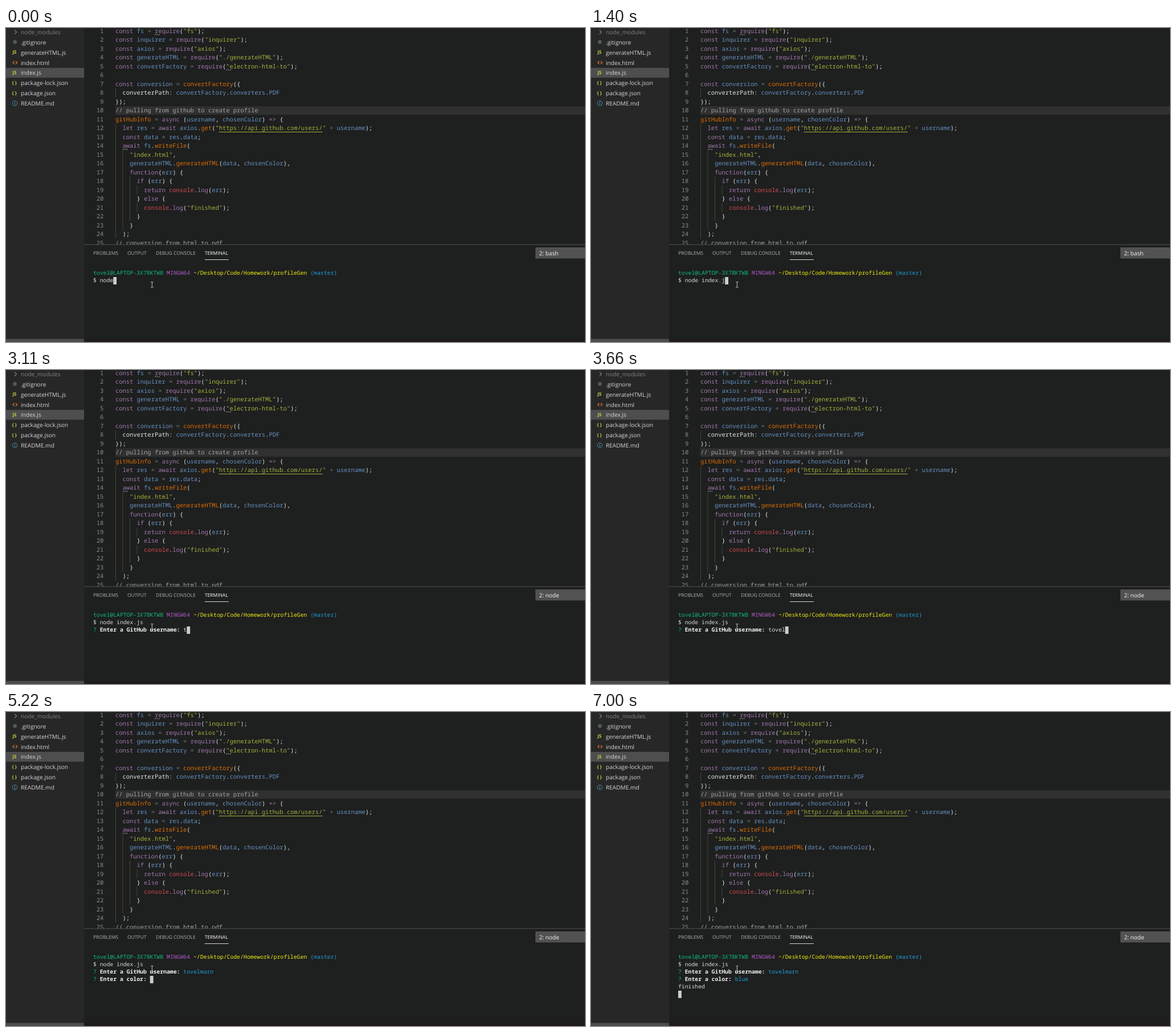
These frames come from a looping animation (1016 by 551 pixels, 8000 ms). An HTML page:

```html
<!DOCTYPE html>
<html lang="en">
<head>
<meta charset="utf-8">
<title>Terminal session</title>
<style>
  html, body { margin: 0; width: 100%; height: 100%; overflow: hidden; background: #1e1f1f; }
  svg { display: block; width: 100%; height: 100%; }
  text { white-space: pre; text-rendering: geometricPrecision; }
  .code { font: 500 10.44px "Noto Sans Mono", monospace; }
  .term { font: 500 9.775px "Noto Sans Mono", monospace; }
  .term.bold { font-weight: 700; }
  .ui { font: 10.1px "Open Sans", sans-serif; }
  .tab { font: 8.5px "Open Sans", sans-serif; }
  .icon { font: 700 8px "Open Sans", sans-serif; }
</style>
</head>
<body>
<svg id="stage" viewBox="0 0 1016 551"></svg>
<script>
const LOOP = 8000;
const BACK = "#1e1f1f";
const stage = document.getElementById("stage");

function add(parent, tag, attrs, content) {
  const el = document.createElementNS("http://www.w3.org/2000/svg", tag);
  for (const key in attrs) el.setAttribute(key, attrs[key]);
  if (content !== undefined) el.textContent = content;
  parent.appendChild(el);
  return el;
}
const rect = (x, y, width, height, fill, parent = stage) =>
  add(parent, "rect", { x, y, width, height, fill });
const label = (x, y, cls, fill, str, parent = stage) =>
  add(parent, "text", { x, y, class: cls, fill }, str);
const stroke = (d, color, width = 1, parent = stage) =>
  add(parent, "path", { d, fill: "none", stroke: color, "stroke-width": width });

const COLORS = {
  p: "#a078ac", b: "#6592c2", w: "#e2e4e2", s: "#a4b23c", o: "#dc6e00",
  r: "#d44a4e", k: "#767776", c: "#a2a3a2",
  G: "#0dbc79", M: "#b05ac8", Y: "#ecec14", C: "#1e9fd4", W: "#d8d8d8", B: "#f0f0f0"
};

// Markup: "^" followed by a colour key starts a run; runs sit on a column grid.
function runs(parent, markup, x, y, cell, cls) {
  let col = 0;
  for (const run of markup.split("^").slice(1)) {
    const str = run.slice(1), lead = str.length - str.trimStart().length;
    if (str.trim()) {
      const style = run[0] === "B" ? cls + " bold" : cls;
      label(x + (col + lead) * cell, y, style, COLORS[run[0]], str.trim(), parent);
    }
    col += str.length;
  }
}

// Editor
const CODE = { x: 192, cell: 6.265, row: 15.48 };
const codeX = col => CODE.x + col * CODE.cell;
const rowMid = n => 144.8 + (n - 10) * CODE.row;
const lines = [
  '^pconst ^bfs ^k= ^prequire^w(^s"fs"^w);',
  '^pconst ^binquirer ^k= ^prequire^w(^s"inquirer"^w);',
  '^pconst ^baxios ^k= ^prequire^w(^s"axios"^w);',
  '^pconst ^bgenerateHTML ^k= ^prequire^w(^s"./generateHTML"^w);',
  '^pconst ^bconvertFactory ^k= ^prequire^w(^s"electron-html-to"^w);',
  '',
  '^pconst ^bconversion ^k= ^oconvertFactory^w({',
  '^w  converterPath: ^bconvertFactory^w.^bconverters^w.^bPDF',
  '^w});',
  '^c// pulling from github to create profile',
  '^ogitHubInfo ^k= ^pasync ^w(^busername^w, ^bchosenColor^w) ^p=> ^w{',
  '^p  let ^bres ^k= ^pawait ^baxios^w.^oget^w(^s"https://api.github.com/users/" ^k+ ^busername^w);',
  '^p  const ^bdata ^k= ^bres^w.^bdata^w;',
  '^p  await ^bfs^w.^owriteFile^w(',
  '^s    "index.html"^w,',
  '^b    generateHTML^w.^ogenerateHTML^w(^bdata^w, ^bchosenColor^w),',
  '^p    function^w(^berr^w) {',
  '^p      if ^w(^berr^w) {',
  '^p        return ^rconsole^w.^plog^w(^berr^w);',
  '^w      } ^pelse ^w{',
  '^r        console^w.^plog^w(^s"finished"^w);',
  '^w      }',
  '^w    }',
  '^w  );',
  '^c// conversion from html to pdf'
];

function drawEditor() {
  rect(0, 0, 1016, 551, BACK);
  rect(CODE.x, 137.4, 824, 14.8, "#303030");
  const guides = [[0, 8, 8], [0, 12, 24], [2, 15, 23], [4, 18, 22], [6, 19, 19], [6, 21, 21]];
  for (const [col, from, to] of guides)
    rect(codeX(col), rowMid(from) - CODE.row / 2, 0.8, (to - from + 1) * CODE.row, "#505037");
  lines.forEach((markup, i) => {
    const y = rowMid(i + 1) + 3.5, num = String(i + 1);
    label(171.2 - num.length * CODE.cell, y, "code", "#8c8c8c", num);
    runs(stage, markup, CODE.x, y, CODE.cell, "code");
  });
  rect(codeX(29), 182, 29 * CODE.cell, 1, COLORS.s);
  for (const [col, line] of [[11, 1], [31, 5], [2, 14]])
    for (let i = 0; i < 3; i++)
      rect(codeX(col) + 0.5 + i * 3.2, rowMid(line) + 5.4, 1.5, 1.4, "#b0b0b0");
}

// Sidebar
const files = [
  ["node_modules", "folder"], [".gitignore", "dot"], ["generateHTML.js", "JS"],
  ["index.html", "tag"], ["index.js", "JS"], ["package-lock.json", "{ }"],
  ["package.json", "{ }"], ["README.md", "info"]
];

function drawIcon(kind, y) {
  if (kind === "folder") stroke(`M15 ${y - 3.6}l3.6 3.6l-3.6 3.6`, "#c5c5c5");
  else if (kind === "dot") add(stage, "circle", { cx: 15.6, cy: y - 0.6, r: 3.4, fill: "#4d5a5e" });
  else if (kind === "tag") stroke(`M14.6 ${y - 2.8}l-2.6 2.6l2.6 2.6M17 ${y - 2.8}l2.6 2.6l-2.6 2.6`, "#e37933", 1.2);
  else if (kind === "info") {
    add(stage, "circle", { cx: 15.5, cy: y - 0.5, r: 4.2, fill: "none", stroke: "#519aba", "stroke-width": 0.9 });
    rect(15, y - 1.2, 1, 3.2, "#519aba");
    rect(15, y - 3, 1, 1, "#519aba");
  } else label(kind === "JS" ? 11.4 : 10.6, y + 2.4, "icon", "#cbcb41", kind);
}

function drawSidebar() {
  rect(0, 0, 137, 551, "#272727");
  rect(0, 70, 137, 17.2, "#4e4e4e");
  files.forEach(([name, kind], i) => {
    const y = 7.2 + i * 17.92;
    drawIcon(kind, y);
    label(26, y + 3.6, "ui", i ? "#d6d6d6" : "#828282", name);
  });
  rect(0, 545.6, 137, 5.4, "#4c4c4c");
}

// Panel
let shellName;
function drawPanel() {
  rect(137, 380, 879, 171, BACK);
  rect(137, 379.6, 879, 1, "#505050");
  const tabs = [[153, "PROBLEMS"], [213, "OUTPUT"], [263, "DEBUG CONSOLE"], [348.7, "TERMINAL"]];
  for (const [x, name] of tabs)
    label(x, 397.9, "tab", name === "TERMINAL" ? "#ffffff" : "#b0b0b0", name);
  rect(348.7, 406, 42, 1, "#d8d8d8");
  rect(929, 385, 87, 19.4, "#525252");
  shellName = label(935.5, 398.8, "ui", "#f6f6f6", "2: bash");
  rect(137, 546, 879, 5, "#201a1d");
}

// Terminal
const TERM = { x: 153, y: 424, cell: 5.865, row: 13.03 };
const HEADER = "^Gtovel@LAPTOP-3X78KTWB ^MMINGW64 ^Y~/Desktop/Code/Homework/profileGen ^C(master)";
const typing = {
  command: [" index.js", [80, 610, 780, 850, 1020, 1170, 1250, 1400, 1570]],
  user: ["tovelmarn", [3110, 3190, 3360, 3510, 3660, 4520, 4670, 4840, 4990]],
  color: ["blue", [6310, 6390, 6540, 6610]]
};
const T = { run: 1720, shell: 1950, askUser: 2330, redraw: 4910, redrawn: 4990, askColor: 5220, enter: 6920, done: 7000 };

function typed(key, t) {
  const [str, times] = typing[key];
  return str.slice(0, times.filter(at => at <= t).length);
}

function session(t) {
  const cmd = typed("command", t), user = typed("user", t), color = typed("color", t);
  const rows = [HEADER, "^W$ node" + cmd];
  let cursor = [1, 6 + cmd.length];
  if (t >= T.run) cursor = [2, 0];
  if (t >= T.askUser) {
    rows.push("^G? ^BEnter a GitHub username: " + (t < T.askColor ? "^W" : "^C") + user);
    cursor = [2, t >= T.redraw && t < T.redrawn ? 0 : 27 + user.length];
  }
  if (t >= T.askColor) {
    rows.push("^G? ^BEnter a color: " + (t < T.enter ? "^W" : "^C") + color);
    cursor = [3, 17 + color.length];
  }
  if (t >= T.enter) cursor = [4, 0];
  if (t >= T.done) {
    rows.push("^Wfinished");
    cursor = [5, 0];
  }
  return { rows, cursor, shell: t < T.shell ? "2: bash" : "2: node" };
}

drawEditor();
drawSidebar();
drawPanel();
const screen = add(stage, "g", {});
stroke("M254 445.6h1.6l.7 .6l.7 -.6h1.6M256.3 446v8.6M254 455h1.6l.7 -.6l.7 .6h1.6", "#d8d8d8", 0.9);

let shown = "";
function frame() {
  const state = session(performance.now() % LOOP);
  const key = JSON.stringify(state);
  if (key !== shown) {
    shown = key;
    screen.replaceChildren();
    state.rows.forEach((markup, i) =>
      runs(screen, markup, TERM.x, TERM.y + i * TERM.row + 9, TERM.cell, "term"));
    const [row, col] = state.cursor;
    rect(TERM.x + col * TERM.cell, Math.round(TERM.y + row * TERM.row), TERM.cell, 13, "#cccccc", screen);
    shellName.textContent = state.shell;
  }
  requestAnimationFrame(frame);
}
frame();
</script>
</body>
</html>
```
